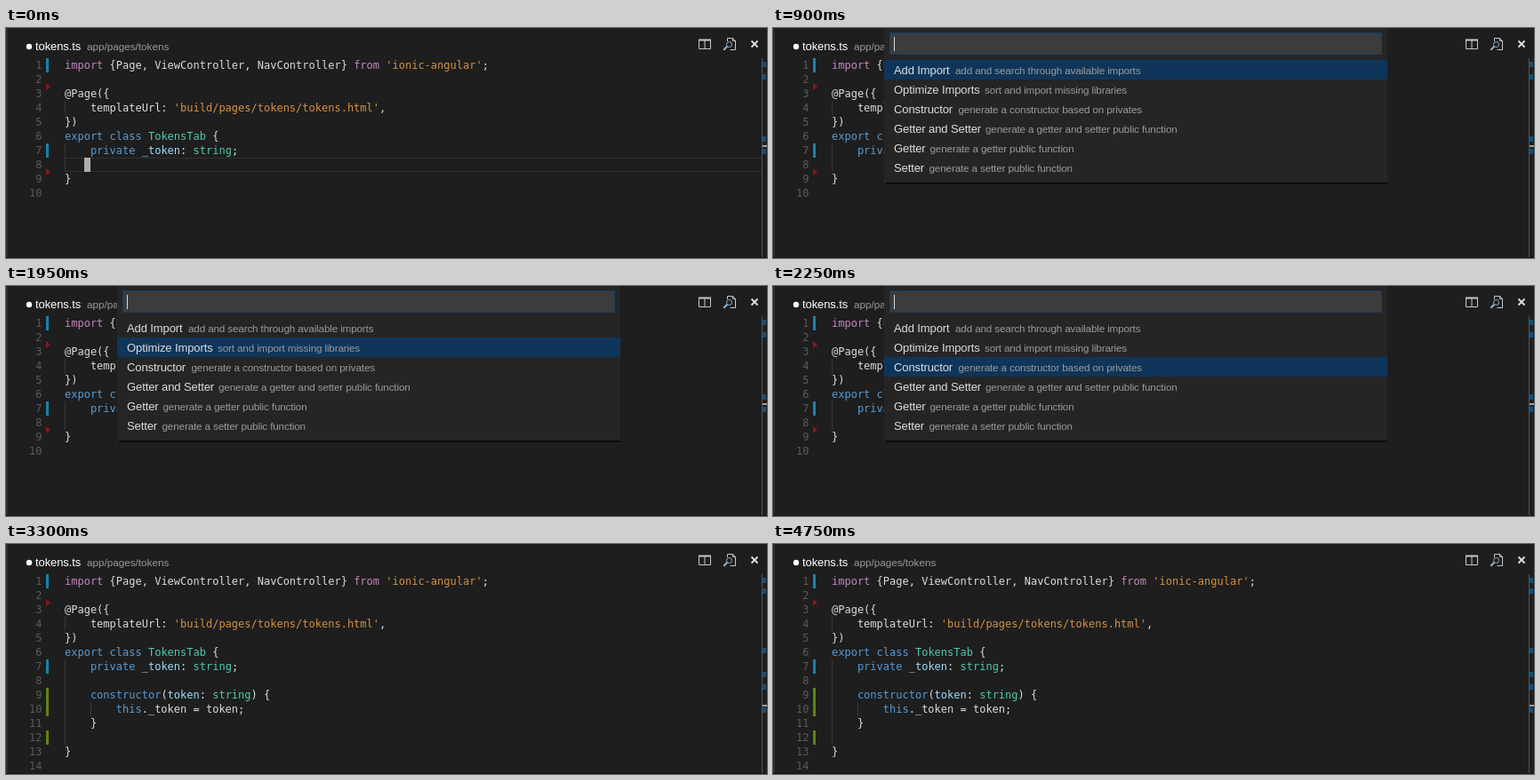
An HTML page for the animation above (4850 ms loop, 856 by 259 pixels).

```html
<!DOCTYPE html>
<html lang="en">
<head>
<meta charset="utf-8">
<title>Generate constructor</title>
<style>
  html, body { margin: 0; width: 100%; height: 100%; overflow: hidden; background: #1e1e1e; }
  svg { display: block; }
  .code { font: 12px "DejaVu Sans Mono", monospace; fill: #dcdcdc; }
  .number { fill: #5a5a5a; text-anchor: end; }
  .label { font: 13px "Liberation Sans", Arial, sans-serif; letter-spacing: -.1px; fill: #dedede; }
  .detail { font: 11.7px "Liberation Sans", Arial, sans-serif; letter-spacing: -.15px; fill: #9a9a9a; }
  .path { letter-spacing: 0; }
  .keyword { fill: #569cd6; }
  .control { fill: #c586c0; }
  .type { fill: #4ec9b0; }
  .name { fill: #9cdcfe; }
  .string { fill: #d69045; }
</style>
</head>
<body>
<svg id="stage" width="856" height="259" viewBox="0 0 856 259">
  <rect width="856" height="259" fill="#1e1e1e"/>
  <rect width="2" height="259" fill="#2d2d2d"/>
  <circle cx="26" cy="21" r="3.2" fill="#fff"/>
  <text class="label" x="33" y="25" style="fill:#fff">tokens.ts</text>
  <text class="detail path" x="91" y="25">app/pages/tokens</text>
  <g fill="none" stroke="#c8c8c8">
    <path d="M779.5 13.5h13v10h-13zM786 14v10"/>
    <path d="M779 13.5h14" stroke-width="2"/>
    <path d="M811.5 15v-3.5h6l3 3v10h-6M817.5 11.5v3h3"/>
    <g stroke="#8fb4d0"><circle cx="813.5" cy="18.5" r="3"/><path d="M811.3 20.8l-4 4" stroke-width="2"/></g>
    <path d="M838.5 14.5l7 7m0-7l-7 7" stroke="#e0e0e0" stroke-width="1.8"/>
  </g>
</svg>
<script>
const LOOP = 4850, LEFT = 66, TOP = 34, ROW = 16, CHAR = 7.224;
const MODIFIED = '#1b81a8', ADDED = '#5d8410', DELETED = '#8c1717';
const stage = document.getElementById('stage');

function add(parent, tag, attrs = {}, text = '') {
  const node = document.createElementNS('http://www.w3.org/2000/svg', tag);
  for (const key in attrs) node.setAttribute(key, attrs[key]);
  node.textContent = text;
  parent.append(node);
  return node;
}
const group = (parent = stage) => add(parent, 'g');
const rect = (parent, x, y, width, height, fill) =>
  add(parent, 'rect', { x, y, width, height, fill });
const lineTop = line => TOP + ROW * (line - 1);

// Each line is an indent followed by runs of "class|text".
const opening = [
  [0, 'control|import', '| {Page, ViewController, NavController} ', 'control|from', '| ', "string|'ionic-angular'", '|;'],
  [0],
  [0, '|@Page({'],
  [4, '|templateUrl: ', "string|'build/pages/tokens/tokens.html'", '|,'],
  [0, '|})'],
  [0, 'keyword|export class', '| ', 'type|TokensTab', '| {'],
  [4, 'keyword|private', '| ', 'name|_token', '|: ', 'type|string', '|;'],
  [0]
];
const generated = [
  [4, 'keyword|constructor', '|(', 'name|token', '|: ', 'type|string', '|) {'],
  [8, 'keyword|this', '|._token = token;'],
  [4, '|}'],
  [0]
];
const closing = [[0, '|}'], [0]];

function drawCode(lines, parent) {
  lines.forEach(([indent, ...runs], i) => {
    const y = lineTop(i + 1) + 12;
    add(parent, 'text', { class: 'code number', x: 40.5, y }, i + 1);
    const text = add(parent, 'text', { class: 'code', x: LEFT + indent * CHAR, y });
    for (const run of runs) {
      const [kind, content] = run.split('|');
      add(text, 'tspan', { class: kind }, content);
    }
  });
}
function guide(parent, column, first, last) {
  rect(parent, Math.round(LEFT + column * CHAR), lineTop(first), 1, ROW * (last - first + 1), '#383838');
}
function gutterBar(parent, first, last, fill) {
  rect(parent, 45, lineTop(first), 3, ROW * (last - first + 1), fill);
}
function deletion(parent, line) {
  add(parent, 'path', { d: `M45 ${lineTop(line) - 4}l5 4l-5 4z`, fill: DELETED });
}
function rulerMarks(parent, tops) {
  for (const y of tops) rect(parent, 851, y, 4, 6, '#10507f');
}
function drawCursor(parent, line) {
  return rect(parent, 88, lineTop(line), 7, ROW, '#aeaeae');
}

gutterBar(stage, 1, 1, MODIFIED);
gutterBar(stage, 7, 7, MODIFIED);
deletion(stage, 3);
rect(stage, 850, TOP, 1, 259 - TOP, '#555');

const before = group();
guide(before, 0, 4, 4);
guide(before, 0, 7, 8);
deletion(before, 9);
rulerMarks(before, [38, 52, 122, 136]);
rect(before, 851, 132, 5, 2, '#a0a0a0');
const currentLine = group(before);
for (const y of [146, 161]) rect(currentLine, LEFT, y, 784, 1, '#303030');
drawCode([...opening, ...closing], before);
const cursorBefore = drawCursor(before, 8);

const after = group();
guide(after, 0, 4, 4);
guide(after, 0, 7, 12);
guide(after, 4, 10, 10);
rulerMarks(after, [38, 50, 117, 184]);
rect(after, 851, 181, 5, 2, '#a0a0a0');
drawCode([...opening, ...generated, ...closing], after);
const staleMark = group(after);
deletion(staleMark, 13);
const addedMarks = group(after);
gutterBar(addedMarks, 9, 10, ADDED);
gutterBar(addedMarks, 12, 12, ADDED);
rulerMarks(addedMarks, [144, 158]);
const cursorAfter = drawCursor(after, 12);

rect(stage, 0, 258, 856, 1, '#151515');

const palette = group();
rect(palette, 127, 174, 564, 2, '#0b0b0b');
rect(palette, 125, 0, 566, 174, '#252526');
add(palette, 'rect', { x: 131.5, y: 5.5, width: 553, height: 24, fill: '#3c3c3c', stroke: '#123f68' });
const caret = rect(palette, 136, 10, 1, 16, '#d8d8d8');
const selection = rect(palette, 125, 36, 566, 22, '#0f355a');
[
  ['Add Import', 205, 'add and search through available imports'],
  ['Optimize Imports', 238, 'sort and import missing libraries'],
  ['Constructor', 208.5, 'generate a constructor based on privates'],
  ['Getter and Setter', 239, 'generate a getter and setter public function'],
  ['Getter', 176.5, 'generate a getter public function'],
  ['Setter', 175.5, 'generate a setter public function']
].forEach(([label, x, detail], i) => {
  const y = 52 + 22 * i;
  add(palette, 'text', { class: 'label', x: 136, y }, label);
  add(palette, 'text', { class: 'detail', x, y }, detail);
});

const show = (node, visible) => node.setAttribute('visibility', visible ? 'inherit' : 'hidden');

function render(t) {
  const within = (from, to) => t >= from && t < to;
  const open = within(900, 2700);
  show(before, t < 2850);
  show(after, t >= 2850);
  show(palette, open);
  show(currentLine, !open);
  show(cursorBefore, t < 450 || within(2700, 2850));
  show(cursorAfter, within(2850, 3300) || within(3750, 4200));
  show(staleMark, t < 3000);
  show(addedMarks, t >= 3000);
  show(caret, !within(1500, 1950));
  selection.setAttribute('y', 36 + 22 * ((t >= 1950) + (t >= 2250)));
}

const start = performance.now();
function tick() {
  render((performance.now() - start) % LOOP);
  requestAnimationFrame(tick);
}
tick();
</script>
</body>
</html>
```
